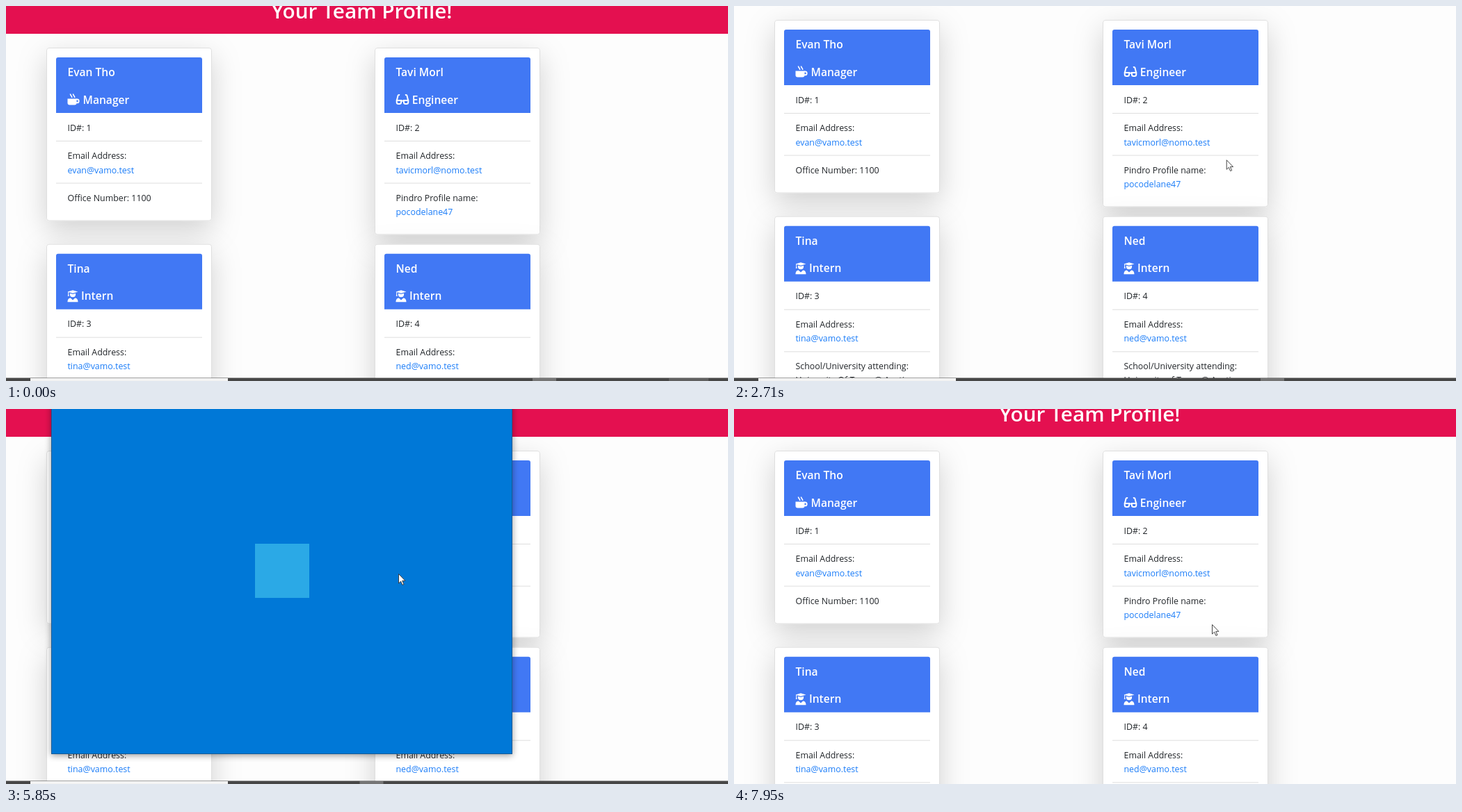
An HTML page for the animation above (8000 ms loop, 1038 by 540 pixels).

```html
<!DOCTYPE html>
<html lang="en">
<head>
<meta charset="utf-8">
<title>Team profile</title>
<style>
html, body { margin: 0; width: 100%; height: 100%; overflow: hidden; background: #fdfdfd; }
svg { display: block; width: 100%; height: 100%; }
text { font-family: "Open Sans", "Noto Sans", sans-serif; font-size: 12.4px; fill: #212529; white-space: pre; }
.title { font-size: 29.7px; font-weight: 600; fill: #fff; text-anchor: middle; }
.head { font-size: 15.6px; font-weight: 600; fill: #fff; }
.link { fill: #1a7cf8; }
.link.hover { fill: #0056b3; text-decoration: underline; }
.ui { font-size: 11.4px; fill: #333; }
.bold { font-weight: 700; fill: #111; }
.soft { fill: #666; }
.pale { fill: #8c8c8c; }
.off { font-size: 10.4px; fill: #c3c9cf; }
.blue { fill: #0078d7; }
.tool { font-size: 15px; fill: #222; text-anchor: middle; }
.style { font-size: 15px; fill: #2f5496; }
.body { font-family: Lato, sans-serif; font-size: 11.3px; fill: #000; }
.body tspan { fill: #00e; text-decoration: underline; }
.line { fill: none; stroke-width: 1.1; }
</style>
</head>
<body>
<svg id="stage" viewBox="0 0 1038 540"></svg>
<script>
const DURATION = 8000;
const rect = (x, y, w, h, fill, more = '') =>
  `<rect x="${x}" y="${y}" width="${w}" height="${h}" fill="${fill}" ${more}/>`;
const text = (x, y, cls, s, more = '') => `<text x="${x}" y="${y}" class="${cls}" ${more}>${s}</text>`;
const line = (d, color, more = '') => `<path class="line" d="${d}" stroke="${color}" ${more}/>`;
const at = (x, y, content) => `<g transform="translate(${x} ${y})">${content}</g>`;

const roleIcons = {
  Manager: [22, `<path fill="#fff" d="M0 7H13V13a3 3 0 0 1-3 3H3a3 3 0 0 1-3-3Z"/>` +
    line('M12.5 8h1.3a2.3 2.3 0 0 1 0 4.8h-1.3', '#fff', 'style="stroke-width:1.9"') +
    line('M4 0c0 3 2.2 2 2.2 5.4M8 0c0 3 2.2 2 2.2 5.4', '#fff', 'style="stroke-width:1.6"')],
  Engineer: [23.3, line('M1.2 10L3 2.7Q3.6 1 5.6 1.8M17.8 10L16 2.7Q15.4 1 13.4 1.8M7.5 10.6q2-1.2 4 0' +
    'M1.2 9.4H7.6V12q0 2.6-2.6 2.6H3.8Q1.2 14.6 1.2 12ZM11.4 9.4H17.8V12q0 2.6-2.6 2.6H14q-2.6 0-2.6-2.6Z',
    '#fff', 'style="stroke-width:2"')],
  Intern: [19.4, `<path fill="#fff" d="M0 2.2L7.5 0 15 2.2 7.5 4.6ZM3.4 4.6L7.5 5.8 11.6 4.6V6a4.1 4.1 0 0 1-8.2 0Z
    M.7 2.5h1V6l.6 2.5H.2L.7 6ZM0 17C0 13 1.8 11.3 4.3 11.2L7.5 14.4 10.7 11.2C13.2 11.3 15 13 15 17Z"/>`]
};

function card(x, y, h, person) {
  const [labelX, icon] = roleIcons[person.role];
  const divider = dy => rect(14, dy, 210, 1, '#dedede');
  return at(x, y,
    rect(.5, .5, 237, h - 1, '#fff', 'rx="3.4" stroke="#dfdfdf" filter="url(#cardShadow)"') +
    `<path fill="#4178f4" d="M14 94V17a3 3 0 0 1 3-3H221a3 3 0 0 1 3 3V94Z"/>` +
    text(30.5, 41, 'head', person.name) + at(30.5, 66.5, icon) + text(30.5 + labelX, 80.8, 'head', person.role) +
    text(30.5, 119.7, '', 'ID#: ' + person.id) + divider(134) +
    text(30.5, 160.3, '', 'Email Address:') + text(30.5, 180.5, 'link', person.contact, `id="contact${person.id}"`) +
    divider(194.6) + text(30.5, 220.7, '', person.detail) + text(30.5, 240.7, person.detailClass, person.value));
}

const school = 'School/University attending:';
const page =
  rect(0, -100, 1038, 140, '#e41050') + text(511.5, 18, 'title', 'Your Team Profile!') +
  card(58, 60, 249.5, { name: 'Evan Tho', role: 'Manager', id: 1, contact: 'evan@vamo.test',
    detail: 'Office Number: 1100', detailClass: '', value: '' }) +
  card(530, 60, 269.5, { name: 'Tavi Morl', role: 'Engineer', id: 2, contact: 'tavicmorl@nomo.test',
    detail: 'Pindro Profile name:', detailClass: 'link', value: 'pocodelane47' }) +
  card(58, 342.7, 269.5, { name: 'Tina', role: 'Intern', id: 3, contact: 'tina@vamo.test',
    detail: school, detailClass: '', value: 'University Of Texas @ Austin' }) +
  card(530, 342.7, 269.5, { name: 'Ned', role: 'Intern', id: 4, contact: 'ned@vamo.test',
    detail: school, detailClass: '', value: 'University of Texas @ Austin' });

// Small glyphs are drawn around their own centre.
const glyphs = {
  menu: 'M-6.5-4.5h13M-6.5 0h13M-6.5 4.5h13',
  plus: 'M-6 0H6M0-6V6',
  person: 'M-3.8-2.6a3.8 3.8 0 1 0 7.6 0a3.8 3.8 0 1 0-7.6 0M-6 7Q-5 1.4 0 1.4T6 7',
  folder: 'M-6.5 5.5v-11h4.5l1.5 2h7v9ZM-6.5-3.3h5',
  envelope: 'M-6.5-4.5h13v9h-13ZM-6.5-4L0 .8 6.5-4',
  calendar: 'M-6.5-6h13v12h-13ZM-6.5-3h13M-4-.5h1.5M-.7-.5H.8M2.5-.5H4M-4 2h1.5M-.7 2H.8M2.5 2H4M-4 4.2h1.5M-.7 4.2H.8',
  people: 'M-5-1a2.4 2.4 0 1 0 4.8 0a2.4 2.4 0 1 0-4.8 0M-6.5 6Q-6 1.5-2.6 1.5T1.2 6M1-4a2.3 2.3 0 1 0 4.6 0a2.3 2.3 0 1 0-4.6 0M1.5-.3Q6-1.5 6.6 3',
  check: 'M-5.5 0L-2 3.8 5.5-4',
  gear: 'M-2.3 0a2.3 2.3 0 1 0 4.6 0a2.3 2.3 0 1 0-4.6 0M-1.2-6.3h2.4l.5 2 1.9-1.1 1.7 1.7-1.1 1.9 2.1.6v2.4l-2 .5 1.1 1.9-1.7 1.7-1.9-1.1-.6 2.1h-2.4l-.5-2-1.9 1.1-1.7-1.7 1.1-1.9-2.1-.6v-2.4l2-.5-1.1-1.9 1.7-1.7 1.9 1.1Z',
  chevron: 'M-4.2-2L0 2.2 4.2-2',
  align: 'M-8-6.5H8M-8-2.2H3M-8 2.2H8M-8 6.5H3',
  rows: 'M-2.5-5.5H8M-2.5 0H8M-2.5 5.5H8',
  bin: 'M-6-4.8H6M-2-5V-7H2V-5M-4.8-4.8V7H4.8V-4.8M-2-2V4.5M0-2V4.5M2-2V4.5',
  send: 'M-7-5.5L7.5 0-7 5.5-4.5 0ZM-4.5 0H7',
  undo: 'M-6.5-7v5.5h5.5M-6.2-1.8Q-2-7 3-5T4 3L-.5 7.5',
  popout: 'M1-5H-9V8H8V1M-9-2H2M0 1L9-7.5M3-7.5H9V-2'
};
const glyph = (name, x, y, color, more) => at(x, y, line(glyphs[name], color, more));

const sideIcons = [['menu', 19], ['plus', 59], ['person', 109], ['folder', 158.5], ['envelope', 317],
  ['calendar', 357], ['people', 397], ['check', 437], ['gear', 477]];
const separator = x => rect(x, 43, 1, 26, '#b9c0c7');
const rule = y => rect(136, y, 562, 1, '#c6ccd2');
const bullets = [-5.5, 0, 5.5];

const compose =
  rect(65, -60, 663, 557, '#f3f8fd') + rect(65, -60, 40, 557, 'url(#sidebar)') + rect(65, 298, 40, 39, '#125796') +
  sideIcons.map(([name, y]) => glyph(name, 85.3, y, '#fff')).join('') +
  text(151, 24, 'ui bold', 'Format') + rect(151, 31, 40, 3, '#0078d7') +
  text(225, 24, 'ui', 'Insert') + text(291, 24, 'ui', 'Draw') + text(354, 24, 'ui', 'Options') +
  glyph('bin', 568.5, 20, '#333') + text(580.5, 24, 'ui', 'Discard') +
  glyph('send', 647.5, 19.5, '#333') + text(659.5, 24, 'ui', 'Send') +
  rect(135, 39, 563, 33, '#e5ebf0') +
  text(152, 61, 'tool', 'B', 'font-weight="700"') +
  text(185, 61, 'tool', 'I', 'style="font-family:\'Noto Serif\',serif;font-style:italic"') +
  text(219, 60, 'tool', 'U') + rect(213.5, 62, 11, 1.2, '#222') +
  glyph('chevron', 253, 56, '#333') + separator(270) +
  at(288, 56, line(glyphs.rows, '#333') + bullets.map(y => rect(-8, y - 1.3, 2.6, 2.6, '#0078d7')).join('')) +
  at(321, 56, line(glyphs.rows, '#333') + bullets.map((y, i) =>
    text(-8, y + 2.3, 'blue', i + 1, 'style="font-size:6.5px"')).join('')) +
  glyph('align', 355, 56, '#333') + glyph('chevron', 389, 56, '#333') + separator(406) +
  rect(410.5, 41.5, 144, 28, '#f3f8fd', 'stroke="#b5bcc3"') + text(423, 61.5, 'style', 'Heading 1') +
  glyph('chevron', 546.5, 56.5, '#333') + separator(559) +
  glyph('undo', 576, 55.5, '#b5bcc4') + text(591, 59.5, 'off', 'Undo') +
  at(643.5, 55.5, line(glyphs.undo, '#b5bcc4', 'transform="scale(-1 1)"')) + text(657.5, 59.5, 'off', 'Redo') +
  text(135, 102, 'ui soft', 'From:') + text(175, 102, 'ui pale', 'tavicmorl@nomo.test') +
  glyph('popout', 682.5, 96.5, '#0078d7') + rule(114) +
  text(136, 136, 'ui soft', 'To:') + text(160, 136, 'ui blue', 'tavicmorl@nomo.test;') +
  glyph('person', 621, 131.5, '#0078d7') + text(644.5, 136, 'ui blue', 'Cc &amp; Bcc') + rule(148) +
  text(136, 170.5, 'ui soft', 'Subject') + rule(182) +
  text(136, 237, 'body', 'Sent from <tspan>Post</tspan> for Meadows 10');

document.getElementById('stage').innerHTML = `
<defs>
  <filter id="cardShadow" filterUnits="userSpaceOnUse" x="-90" y="-90" width="420" height="480">
    <feDropShadow dx="0" dy="13.4" stdDeviation="20" flood-color="#000" flood-opacity=".175"/>
  </filter>
  <filter id="windowShadow" filterUnits="userSpaceOnUse" x="20" y="-100" width="760" height="640">
    <feDropShadow dx="0" dy="2" stdDeviation="5" flood-color="#000" flood-opacity=".4"/>
  </filter>
  <linearGradient id="sidebar" gradientUnits="userSpaceOnUse" x1="85" y1="0" x2="92" y2="497">
    <stop offset="0" stop-color="#1a7ccb"/><stop offset=".38" stop-color="#1970b9"/>
    <stop offset=".48" stop-color="#115691"/><stop offset=".55" stop-color="#0a3c68"/>
    <stop offset=".7" stop-color="#08416f"/><stop offset=".84" stop-color="#062c50"/>
    <stop offset=".93" stop-color="#14609f"/><stop offset="1" stop-color="#1b78c3"/>
  </linearGradient>
</defs>
<g id="page">${page}</g>
<g id="window">
  ${rect(65, -60, 663, 557, '#0078d7', 'filter="url(#windowShadow)"')}
  <g id="compose">${compose}</g>
  ${rect(65, -60, 663, 557, '#0078d7', 'id="splash"')}
  ${rect(358, 194, 78, 78, '#2ba9e6', 'id="appMark"')}
  ${rect(65.5, -60, 662, 556.5, 'none', 'stroke="#1d4f7c" stroke-opacity=".7"')}
</g>
<g id="bar">
  ${rect(0, 535.5, 1038, 5, '#474747')}${rect(35, 536, 284, 4, '#f3f3f3')}
  ${rect(757, 536, 34, 4, '#757575', 'id="lit"')}${rect(953, 536, 57, 4, '#606060', 'id="tray"')}
</g>
<path id="cursor" d="M.5.5V14L3.6 11.1 5.9 16.3 8 15.4 5.7 10.3H9.9Z" fill="#fff" stroke="#333" stroke-width=".9"/>`;

// The screen refreshes only at these moments: [first, last, count].
const refreshes = [[0, 0, 1], [130, 190, 2], [350, 440, 2], [920, 1300, 6], [1690, 2150, 7], [2710, 2860, 3],
  [3250, 3790, 8], [3950, 4100, 3], [4410, 5200, 11], [5300, 5300, 1], [5470, 5850, 6], [6080, 6240, 3],
  [6460, 7020, 8], [7180, 7950, 11]]
  .flatMap(([first, last, n]) => Array.from({ length: n }, (_, i) =>
    Math.floor((first + (n > 1 ? (last - first) * i / (n - 1) : 0)) / 10) * 10));

const cursorPath = [[190, 606, 363], [350, 613, 376], [440, 624, 391], [850, 624, 391], [920, 628, 383],
  [1080, 672, 296], [1220, 706, 226], [1300, 710, 217], [2650, 710, 217], [2860, 702, 232], [3180, 702, 232],
  [3250, 675, 237], [3550, 289, 263], [3630, 215, 267], [3790, 170, 246], [3880, 170, 246], [4100, 160, 238],
  [4330, 160, 238], [4410, 172, 232], [4700, 330, 207], [5000, 520, 214], [5200, 564, 237], [6390, 564, 237],
  [6860, 690, 60], [7020, 704, 34], [7110, 704, 34], [7250, 706, -20], [7560, 706, -20], [7790, 695, 215],
  [7950, 687, 310]];
const scrollPath = [[1620, 0], [1690, 14], [1760, 43.7], [1840, 66], [1990, 84], [2150, 88], [2640, 88], [2710, 40],
  [2780, 10], [2860, 0]];
const windowPath = [[5540, 0, .88], [5620, .4, .92], [5690, .85, .97], [5770, 1, .99], [5850, 1, 1], [7330, 1, 1],
  [7410, .7, .97], [7560, 0, .9]];
const splashPath = [[6000, 1, 1], [6080, .5, .6], [6160, 0, .07], [6240, 0, 0]];

function sample(path, t) {
  const next = path.findIndex(key => key[0] > t);
  if (next === 0) return path[0].slice(1);
  if (next < 0) return path.at(-1).slice(1);
  const a = path[next - 1], b = path[next], k = (t - a[0]) / (b[0] - a[0]);
  return a.slice(1).map((v, i) => v + (b[i + 1] - v) * k);
}

const el = id => document.getElementById(id);
const set = (id, attributes) => Object.entries(attributes).forEach(([k, v]) => el(id).setAttribute(k, v));

function draw(now) {
  const time = now % DURATION;
  const t = refreshes.findLast(moment => moment <= time);
  const [x, y] = sample(cursorPath, t);
  const [scroll] = sample(scrollPath, t);
  const [opacity, scale] = sample(windowPath, t);
  const [splash, mark] = sample(splashPath, t);

  set('page', { transform: `translate(0 ${-scroll})` });
  el('contact1').classList.toggle('hover', t >= 3950 && t < 4410);
  el('contact2').classList.toggle('hover', t >= 5110 && t < 6400);
  set('window', { opacity, transform: `translate(397 228) scale(${scale}) translate(-397 -228)`,
    visibility: opacity > 0 ? 'visible' : 'hidden' });
  set('compose', { opacity: t < 6080 ? 0 : 1 });
  set('splash', { opacity: splash });
  set('appMark', { opacity: mark });
  set('bar', { opacity: t < 7560 ? 1 : 0 });
  set('lit', { x: t < 5300 ? 757 : t < 5620 ? 651 : 508.5 });
  set('tray', { opacity: t < 130 ? 1 : 0 });
  set('cursor', { opacity: t < 130 ? 0 : 1, transform: `translate(${x} ${y})` });
  requestAnimationFrame(() => draw(performance.now()));
}
draw(0);
</script>
</body>
</html>
```
